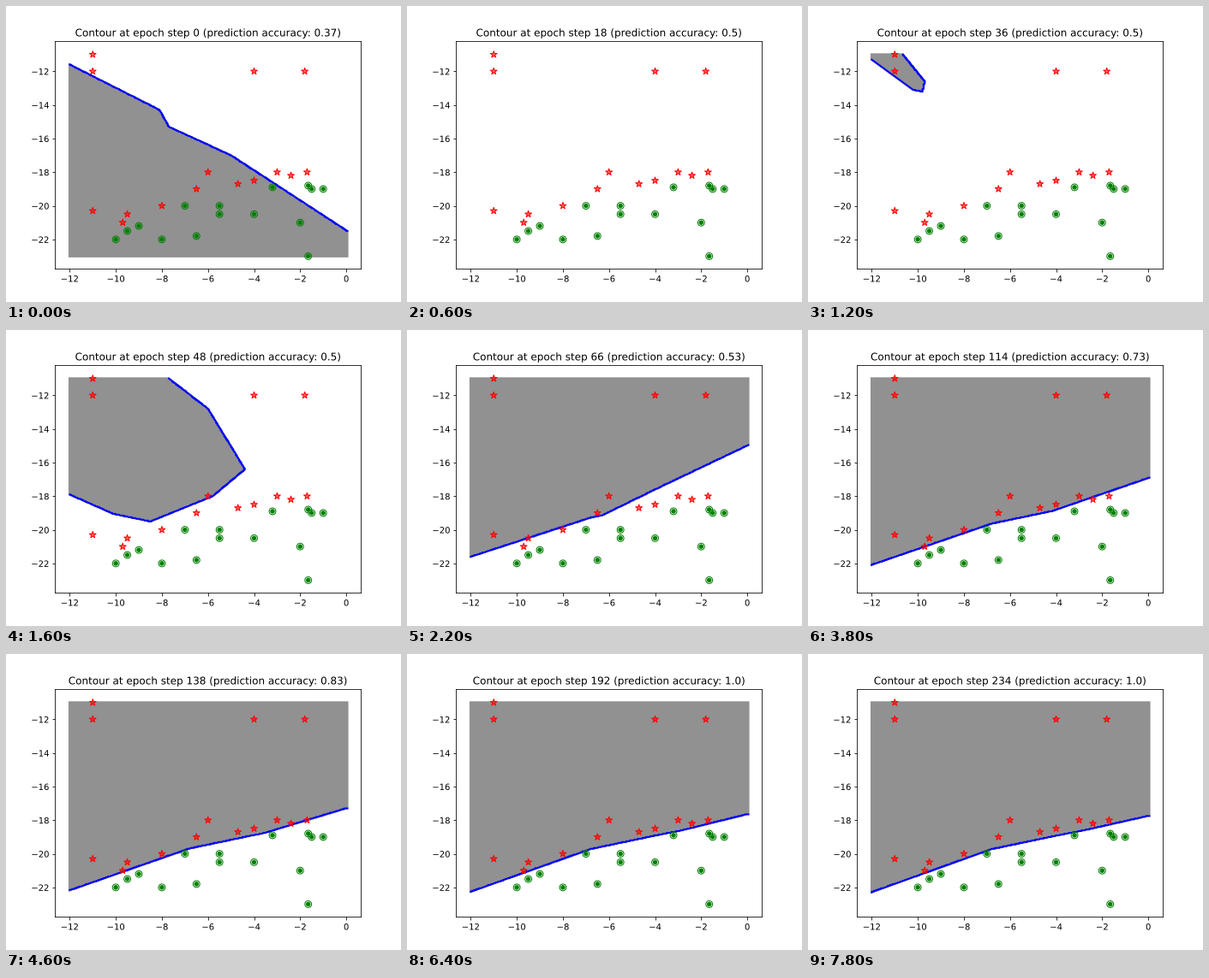
Write a matplotlib script that moves like this. It is 461 px wide and 346 px high and loops after 8 s.

```python
import numpy as np
import matplotlib.pyplot as plt
from matplotlib.animation import FuncAnimation
from matplotlib.patheffects import Normal

W, H, DPI = 461, 346, 72
FRAMES, INTERVAL, EPOCHS_PER_FRAME = 40, 200, 6
LEFT, RIGHT, LOW, HIGH = -12, 0.04, -23, -11
GRID = 0.05

STARS = [(-11, -11), (-11, -12), (-4, -12), (-1.8, -12), (-6, -18),
         (-3, -18), (-2.4, -18.2), (-1.7, -18), (-4, -18.5), (-4.7, -18.7),
         (-6.5, -19), (-8, -20), (-11, -20.3), (-9.5, -20.5), (-9.7, -21)]
DISCS = [(-10, -22), (-9.5, -21.5), (-9, -21.2), (-8, -22), (-7, -20),
         (-6.5, -21.8), (-5.5, -20), (-5.5, -20.5), (-4, -20.5),
         (-3.2, -18.9), (-2, -21), (-1.65, -18.8), (-1.5, -19), (-1, -19),
         (-1.65, -23)]

# Corners of the boundary: before training, and as a patch that grows
START = [(LEFT, -11.6), (-8.1, -14.3), (-7.7, -15.3), (-5, -17), (RIGHT, -21.5)]
SMALL = [(-10.65, HIGH), (-9.7, -12.6), (-9.8, -13.2), (-10.2, -13.1), (LEFT, -11.3)]
LARGE = [(-7.7, HIGH), (-6, -12.8), (-4.4, -16.4), (-5.8, -18),
         (-8.5, -19.5), (-10.1, -19.05), (LEFT, -17.9)]


def resample(points, n=500):
    """Spread n points evenly along a polyline."""
    p = np.array(points, float)
    dist = np.r_[0, np.cumsum(np.hypot(*np.diff(p, axis=0).T))]
    s = np.linspace(0, dist[-1], n)
    return np.column_stack([np.interp(s, dist, p[:, k]) for k in (0, 1)])


def settling_line(epoch):
    """A bent line whose right half swings down while its left end sinks."""
    def decay(tau):
        return np.exp((90 - epoch) / tau)

    x = np.linspace(LEFT, RIGHT, 500)
    y = np.interp(x, [-12, -6.8, -4, 0], [-22.3, -19.72, -18.92, -17.85])
    hinge = -2.4 - 2.6 * decay(60)
    y += 0.28 * decay(75) * np.maximum(0, x - hinge)
    y += 0.2 * decay(30) + 0.035 * decay(70) * np.maximum(0, -6.8 - x)
    return np.column_stack([x, y])


def boundary(epoch):
    """Return the boundary curve and the corners closing the shaded area."""
    if epoch < 36:
        curve = resample(START) - [0, 0.055 * epoch ** 2]
        curve = curve[curve[:, 1] >= LOW]
        return curve, [(x, LOW) for x in (*curve[-1:, 0], LEFT)]
    if epoch < 54:
        t = (epoch - 36) / 12
        return (1 - t) * resample(SMALL) + t * resample(LARGE), [(LEFT, HIGH)]
    return settling_line(epoch), [(RIGHT, HIGH), (LEFT, HIGH)]


def accuracy(epoch):
    hits = np.interp(epoch, [0, 12, 54, 90, 138, 192], [11, 15, 15, 20, 25, 30])
    return round(int(hits + 1e-6) / 30, 2)


def markers(points, **style):
    # One width per marker keeps positions from being rounded to whole pixels
    ax.scatter(*zip(*points), lw=[1] * len(points), zorder=3, **style)


fig, ax = plt.subplots(figsize=(W / DPI, H / DPI), dpi=DPI)
fig.subplots_adjust(left=57.4 / W, right=414.4 / W,
                    bottom=1 - 307.4 / H, top=1 - 41.4 / H)
ax.set_xlim(-12.63, 0.643)
ax.set_ylim(-23.76, -10.22)

area, = ax.fill([], [], fc="#919191", ec="#919191", lw=2.8,
                joinstyle="miter", zorder=1)
edge, = ax.plot([], [], color="blue", lw=2, snap=False, zorder=2)
markers(STARS, s=68, marker="*", fc=(1, 0, 0, 0.6), ec="red")
markers(DISCS, s=62, fc="none", ec="green")
markers(DISCS, s=30, fc="green", ec="none")
title = ax.set_title("")

# Drawing glyphs as outlines leaves them unhinted
for text in [title, *ax.get_xticklabels(), *ax.get_yticklabels()]:
    text.set_path_effects([Normal()])


def draw(i):
    epoch = i * EPOCHS_PER_FRAME
    curve, corners = boundary(epoch)
    edge.set_data(*(np.round(curve / GRID) * GRID).T)
    area.set_visible(len(curve) > 0)
    area.set_xy(np.vstack([curve, corners]))
    title.set_text(f"Contour at epoch step {epoch} "
                   f"(prediction accuracy: {accuracy(epoch)})")
    return area, edge, title


anim = FuncAnimation(fig, draw, frames=FRAMES, init_func=lambda: draw(0),
                     interval=INTERVAL, repeat=True, repeat_delay=0)
plt.show()
```
